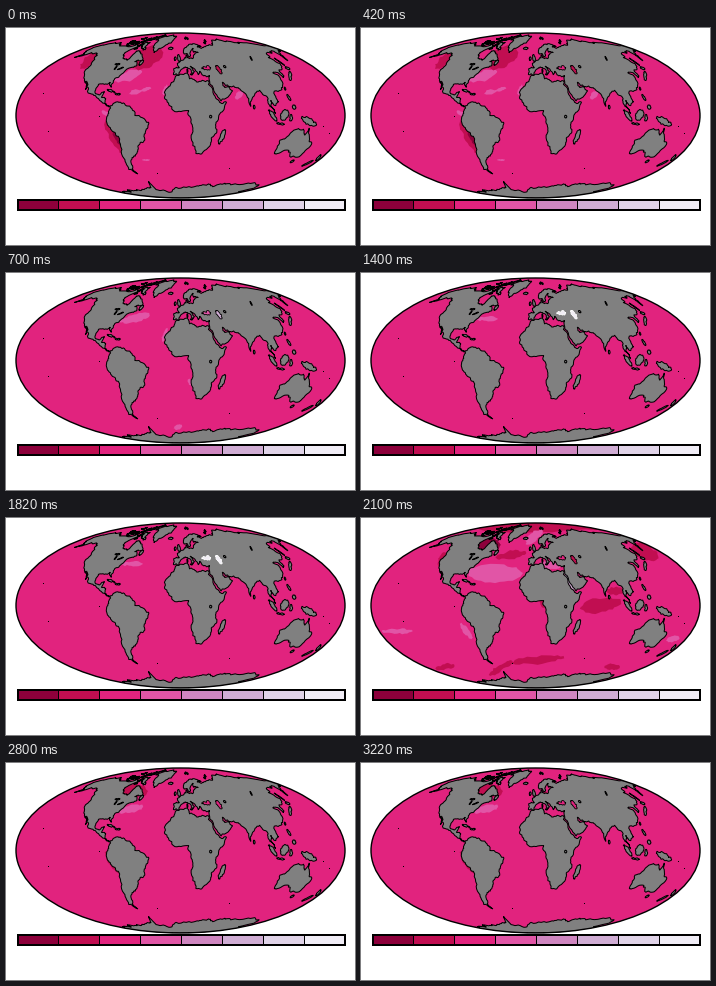
Animation, 349 px wide and 217 px high, one loop 3500 ms. Source, as a matplotlib script:

```python
import matplotlib.pyplot as plt
import numpy as np
from matplotlib.animation import FuncAnimation
from matplotlib.patches import Ellipse, Polygon, Rectangle

W, H, DPI = 349, 217, 100
PX = 72 / DPI
CX, CY, RX, RY = 174.5, 87.5, 164.5, 82.5
LAND = "#808080"
LEVELS = plt.get_cmap("PuRd_r")(0.1 + 0.122 * np.arange(8))
SEA = LEVELS[2]
DARK, CRIMSON, PINK, LILAC, WHITE = 0, 1, 3, 5, 7
rng = np.random.default_rng(8)

# Corner points of the coasts as (longitude, latitude)
NORTH_AMERICA = [
    (-168, 66), (-157, 71), (-128, 70), (-96, 68), (-94, 72), (-82, 67),
    (-94, 60), (-92, 57), (-82, 53), (-79, 51.5), (-77, 57), (-77, 62),
    (-70, 61), (-65, 58.5), (-56, 52), (-66, 50), (-60, 46), (-70, 43),
    (-76, 36), (-81, 31.5), (-80.5, 25.2), (-84, 30), (-97, 28),
    (-97, 20), (-91, 18.7), (-87, 21.4), (-88.5, 16), (-83.5, 15),
    (-82, 9), (-77.5, 8), (-86, 11), (-94, 16), (-105, 20), (-114, 31),
    (-109.6, 23), (-117, 33), (-124, 40), (-124, 47), (-138, 59),
    (-150, 60), (-164, 54.7), (-158, 58.5), (-165, 61.5),
]
SOUTH_AMERICA = [
    (-77.4, 8.5), (-72, 11.8), (-62, 10.6), (-51, 4), (-50, 0), (-35, -6),
    (-39, -14), (-41, -22), (-48, -26), (-53.5, -34), (-57, -37),
    (-65, -41.5), (-69, -51), (-66, -55), (-75, -50), (-73, -37),
    (-70.3, -18.5), (-76, -14), (-81, -6), (-78.5, 2),
]
AFRICA = [
    (-6, 35.8), (10, 37.2), (11, 33), (19, 30.3), (34, 31.2), (33, 28),
    (39.5, 15.3), (43.3, 11.7), (51, 11.8), (47, 4.5), (39, -6),
    (40.6, -15), (35, -20), (35, -24), (27, -33.6), (19, -34.5),
    (12, -17.5), (13.7, -11), (9, 0), (9, 4.3), (-8, 4.5), (-17, 14.5),
    (-16, 24), (-9.7, 30),
]
ASIA = [
    (28, 71), (41, 67), (33, 66.5), (44, 66), (67, 69), (73, 72),
    (104, 77.7), (113, 74), (140, 72.5), (190, 69), (179, 62.5),
    (163, 58), (157, 51), (163, 61.5), (143, 59.3), (135, 54.7), (140, 48),
    (128, 40), (129, 36), (126.5, 34.5), (125, 39), (118, 39), (122, 37),
    (122, 30), (114, 22.3), (106, 20), (109, 12), (105, 8.7),
    (100.5, 13.5), (99.5, 9), (104, 1.4), (98.5, 8), (97, 17), (91, 22.6),
    (80, 15), (77.5, 8.1), (73, 20), (67, 25),
]
EUROPE = [
    (57, 26), (50, 30), (51.5, 25), (56, 26), (59.7, 22), (45, 12.8),
    (35, 28), (36, 36.5), (27, 37), (25, 40.5), (22.5, 36.8), (19.5, 41.5),
    (13, 45.5), (18, 40), (16, 38), (9, 44.3), (3.5, 43.2), (-2, 36.8),
    (-9, 37.3), (-9, 43), (-1.5, 44), (-4.5, 48.3), (8.5, 54), (10, 57.5),
    (11, 54.3), (20, 54.7), (24, 59), (30, 60), (22, 60.5), (24, 65.3),
    (17, 61), (16, 56.5), (12.8, 55.6), (11, 59), (6, 58.5), (5, 62),
    (14, 68),
]
AUSTRALIA = [
    (114, -22), (122, -18), (130, -12), (136.5, -12), (140, -17.5),
    (142.5, -11), (146, -19), (153, -26), (150, -37.5), (140, -38),
    (131, -31.5), (118, -35), (115, -33),
]
ANTARCTICA = [
    (-200, -78.5), (-150, -77), (-110, -74), (-70, -72), (-58, -63.5),
    (-61, -74), (-35, -78), (-10, -71), (35, -69), (55, -66.5),
    (72, -69.5), (90, -66.3), (135, -66), (170, -72), (165, -77),
    (200, -78), (200, -89.5), (-200, -89.5),
]
GREENLAND = [
    (-45, 60), (-53, 66), (-56, 74), (-72, 78), (-45, 83.3), (-14, 81.5),
    (-21, 72), (-40, 65),
]

# Smaller outlines as (centre x, centre y, width, height, turn)
NORTH_ISLES = [
    (-18.5, 65, 9, 2.5, 0), (-2.5, 54, 8, 4, 110), (-8, 53.3, 4, 3, 90),
    (-56, 49, 6, 4, 60), (-79.5, 21.7, 11, 1.5, -15), (-71, 19, 6, 1.5, 0),
    (9, 41, 4, 1.2, 90), (14, 37.5, 3, 1.2, 0), (137, 36, 13, 2.5, 42),
    (143, 43.5, 5, 3, 0), (143, 50, 8, 1.5, 95), (121, 24, 3, 1.4, 70),
]
SOUTH_ISLES = [
    (47, -19, 14, 5, 72), (81, 7.5, 3.5, 2, 90), (121.5, 16, 6, 2.5, 110),
    (125, 7.5, 4, 4, 0), (114, 0.5, 11, 8, 50), (101, 0, 14, 3.5, -47),
    (110, -7.3, 9, 1.5, -8), (121, -2, 6, 3, 90), (141, -5, 19, 6, -22),
    (147, -42, 3.5, 3, 0), (176, -38.5, 7, 2.5, -60), (170.5, -44, 8, 3, 42),
]
ARCTIC = [
    (-73, 68, 20, 5, -30), (-110, 71, 14, 4, 0), (-80, 80, 28, 4, 15),
    (-84, 64.8, 6, 2, 0), (60, 73.5, 14, 2, 25), (18, 78.5, 12, 2, 0),
]
LAKES = [
    (-88, 47.6, 7, 1.5, 0), (-87, 44, 4, 1.3, 90), (-80, 43.2, 7, 1.2, 20),
    (33, -1, 2.5, 2.5, 0), (107, 53.5, 6, 1, 45), (60, 45, 3, 2.5, 0),
]
INLAND = [(34.5, 43.5, 12, 4, 0), (50.7, 42, 9, 4.5, 110)]
INLAND_LEVELS = [(2, CRIMSON), (PINK, LILAC), (WHITE, WHITE), (2, CRIMSON),
                 (2, 2)]
SPECKS = [(37, 65), (93, 88), (42, 103), (151, 145), (223, 140), (307, 94),
          (317, 98), (323, 105)]

# Anomaly areas of each step in stage pixels, by level
STEPS = [
    {PINK: [(122, 48, 30, 9, 160), (134, 63, 24, 4, 165), (159, 62, 12, 4, 110),
            (233, 67, 11, 6, 130), (99, 85, 8, 4, 30), (140, 132, 8, 2, 0)],
     CRIMSON: [(141, 30, 36, 20, 150), (84, 31, 28, 10, 135),
               (109, 110, 40, 9, 62), (185, 34, 14, 9, 0)],
     DARK: [(110, 107, 24, 5, 65)]},
    {PINK: [(129, 45, 32, 7, 165), (159, 62, 15, 4, 110),
            (172, 154, 9, 5, 160), (185, 110, 10, 5, 60),
            (106, 100, 12, 4, 60)]},
    {PINK: [(125, 46, 24, 5, 0)]},
    {CRIMSON: [(178, 8, 150, 13, 0), (150, 37, 32, 8, 170),
               (240, 87, 43, 15, 170), (254, 73, 17, 9, 0),
               (284, 34, 30, 15, 25), (82, 43, 18, 9, 100),
               (184, 84, 10, 13, 0), (84, 149, 20, 6, 170),
               (176, 142, 58, 7, 174), (140, 150, 28, 6, 150),
               (251, 149, 16, 6, 0)],
     DARK: [(127, 27, 26, 14, 0)],
     PINK: [(134, 55, 56, 18, 0), (173, 19, 22, 9, 140),
            (190, 47, 24, 8, 0), (36, 113, 32, 4, 0),
            (105, 113, 20, 6, 55), (312, 121, 14, 6, 165)],
     LILAC: [(208, 63, 22, 4, 62)]},
    {PINK: [(125, 46, 26, 7, 165)],
     CRIMSON: [(128, 28, 28, 15, 0), (106, 99, 26, 6, 58),
               (185, 34, 14, 9, 0)]},
]


def blob(x, y, width, height, turn, n=9):
    """Corner points of a turned oval."""
    a = np.linspace(0, 2 * np.pi, n, endpoint=False)
    u, v, t = width / 2 * np.cos(a), height / 2 * np.sin(a), np.radians(turn)
    return list(zip(x + u * np.cos(t) - v * np.sin(t),
                    y + u * np.sin(t) + v * np.cos(t)))


def rough(points, depth=3, amount=0.13, limit=1.0):
    """Close an outline and fray it by midpoint displacement."""
    p = np.array(points + points[:1], float)
    for _ in range(depth):
        d = np.diff(p, axis=0)
        shift = np.c_[-d[:, 1], d[:, 0]] * rng.normal(0, amount, (len(d), 1))
        out = np.empty((2 * len(d) + 1, 2))
        out[::2] = p
        out[1::2] = (p[:-1] + p[1:]) / 2 + np.clip(shift, -limit, limit)
        p = out
    return p


THETA = np.linspace(-np.pi / 2, np.pi / 2, 2001)
SIN_LAT = (2 * THETA + np.sin(2 * THETA)) / np.pi


def mollweide(points):
    lon, lat = points.T
    t = np.interp(np.sin(np.radians(np.clip(lat, -90, 90))), SIN_LAT, THETA)
    return np.c_[CX + RX * lon / 180 * np.cos(t), CY - RY * np.sin(t)]


fig = plt.figure(figsize=(W / DPI, H / DPI), dpi=DPI, facecolor="white")
ax = fig.add_axes([0, 0, 1, 1])
ax.set(xlim=(0, W), ylim=(H, 0))
ax.axis("off")

globe = Ellipse((CX, CY), 2 * RX, 2 * RY, fc=SEA, ec="none", zorder=0)
ax.add_patch(globe)


def add_shape(outline, color, z, edge="none", width=0.0):
    shape = Polygon(outline, fc=color, ec=edge, lw=width * PX, zorder=z)
    ax.add_patch(shape)
    shape.set_clip_path(globe)
    return shape


groups = [[add_shape(rough(blob(*area), 2, 0.12), LEVELS[level], 1)
           for level, areas in step.items() for area in areas]
          for step in STEPS]

for coast in (NORTH_AMERICA, SOUTH_AMERICA, AFRICA, ASIA + EUROPE, AUSTRALIA,
              ANTARCTICA, GREENLAND):
    add_shape(mollweide(rough(coast)), LAND, 2, "black", 1)
for oval in NORTH_ISLES + SOUTH_ISLES + LAKES:
    add_shape(mollweide(rough(blob(*oval), 2)), LAND, 2, "black", 1)

# Broken-up islands of the far north
scatter = [(rng.uniform(-122, -78), rng.uniform(69, 78), rng.uniform(4, 11),
            rng.uniform(1, 2.5), rng.uniform(-30, 30)) for _ in range(14)]
for oval in ARCTIC + scatter:
    add_shape(mollweide(rough(blob(*oval), 2, 0.25, 2)), LAND, 2, "black", 1)

inland = [add_shape(mollweide(rough(blob(*oval), 2, 0.3)), SEA, 3, "black", 0.8)
          for oval in INLAND]
for x, y in SPECKS:
    ax.add_patch(Rectangle((x, y), 1, 1, fc="black", ec="none", zorder=3))

ax.add_patch(Ellipse((CX, CY), 2 * RX, 2 * RY, fc="none", ec="black",
                     lw=1.4 * PX, zorder=4))

# Colour scale
for i, color in enumerate(LEVELS):
    ax.add_patch(Rectangle((11.5 + 40.9 * i, 172), 40.9, 9.5, fc=color,
                           ec="black", lw=PX, zorder=5))
ax.add_patch(Rectangle((11.5, 172), 327.2, 9.5, fc="none", ec="black",
                       lw=2 * PX, zorder=6))


def update(step):
    for i, group in enumerate(groups):
        for shape in group:
            shape.set_visible(i == step)
    for shape, level in zip(inland, INLAND_LEVELS[step]):
        shape.set_facecolor(LEVELS[level])
        shape.set_edgecolor("white" if level == WHITE else "black")
    return []


anim = FuncAnimation(fig, update, frames=5, interval=700, repeat=True,
                     repeat_delay=0)
plt.show()
```
